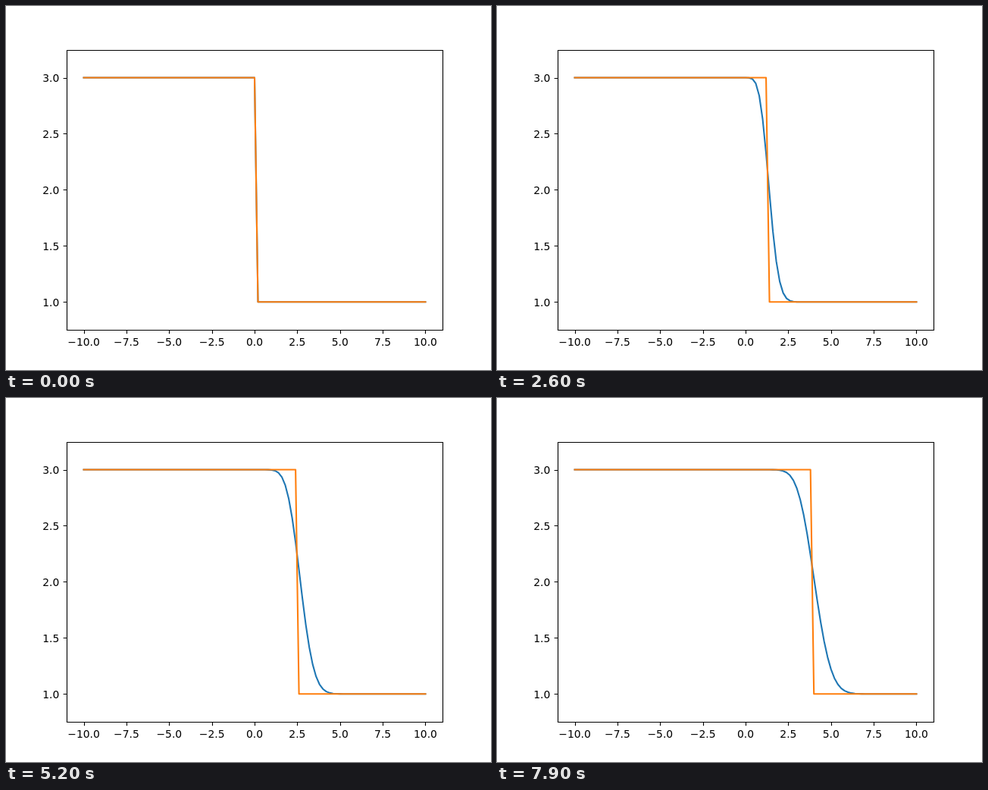
An HTML page with a canvas that plays this animation: 640 by 480 pixels, repeating every 8 s.

```html
<!DOCTYPE html>
<html lang="en">
<head>
<meta charset="utf-8">
<title>Upwind advection of a step</title>
<style>
html, body { margin: 0; width: 100%; height: 100%; overflow: hidden; background: #fff; }
canvas { display: block; }
</style>
</head>
<body>
<canvas id="plot" width="640" height="480"></canvas>
<script>
const ctx = document.getElementById('plot').getContext('2d');
const LEFT = 80, RIGHT = 576, TOP = 57.6, BOTTOM = 427.2;
const DX = 0.2, DT = 0.05, STEPS = 80, STEP_MS = 100;
const xs = Array.from({ length: 101 }, (_, i) => i * DX - 10);

const px = x => (LEFT + RIGHT) / 2 + x * (RIGHT - LEFT) / 22;
const py = y => BOTTOM - (y - 0.75) * (BOTTOM - TOP) / 2.5;
const snap = v => Math.floor(v + 0.5) + 0.5;
const label = v => v.toFixed(1).replace('-', '\u2212');

const exact = n => xs.map(x => x <= n * DT ? 3 : 1);

// First-order upwind scheme, one time step per picture
const numeric = [exact(0)];
for (let n = 1; n < STEPS; n++) {
  const u = numeric[n - 1];
  numeric.push(u.map((v, i) => i ? v - DT / DX * (v - u[i - 1]) : v));
}

function curve(values, color) {
  ctx.beginPath();
  values.forEach((v, i) => ctx.lineTo(px(xs[i]), py(v)));
  ctx.strokeStyle = color;
  ctx.lineWidth = 2.083;
  ctx.lineJoin = 'round';
  ctx.lineCap = 'square';
  ctx.stroke();
}

function axes() {
  const left = snap(LEFT), top = snap(TOP), bottom = snap(BOTTOM);
  ctx.strokeStyle = ctx.fillStyle = '#000';
  ctx.lineWidth = 1.11;
  ctx.lineJoin = 'miter';
  ctx.lineCap = 'butt';
  ctx.font = '13.889px "DejaVu Sans", sans-serif';
  ctx.beginPath();
  ctx.rect(left, top, snap(RIGHT) - left, bottom - top);
  ctx.textAlign = 'center';
  for (let x = -10; x <= 10; x += 2.5) {
    ctx.moveTo(snap(px(x)), bottom);
    ctx.lineTo(snap(px(x)), bottom + 4.86);
    ctx.fillText(label(x), px(x), 448);
  }
  ctx.textAlign = 'right';
  for (let y = 1; y <= 3; y += 0.5) {
    ctx.moveTo(left, snap(py(y)));
    ctx.lineTo(left - 4.86, snap(py(y)));
    ctx.fillText(label(y), 70.3, Math.round(py(y) + 5.3));
  }
  ctx.stroke();
}

function draw(now) {
  const n = Math.floor(now / STEP_MS) % STEPS;
  ctx.fillStyle = '#fff';
  ctx.fillRect(0, 0, 640, 480);
  curve(numeric[n], '#1f77b4');
  curve(exact(n), '#ff7f0e');
  axes();
}

const start = performance.now();
function tick() {
  draw(performance.now() - start);
  requestAnimationFrame(tick);
}
tick();
</script>
</body>
</html>
```
